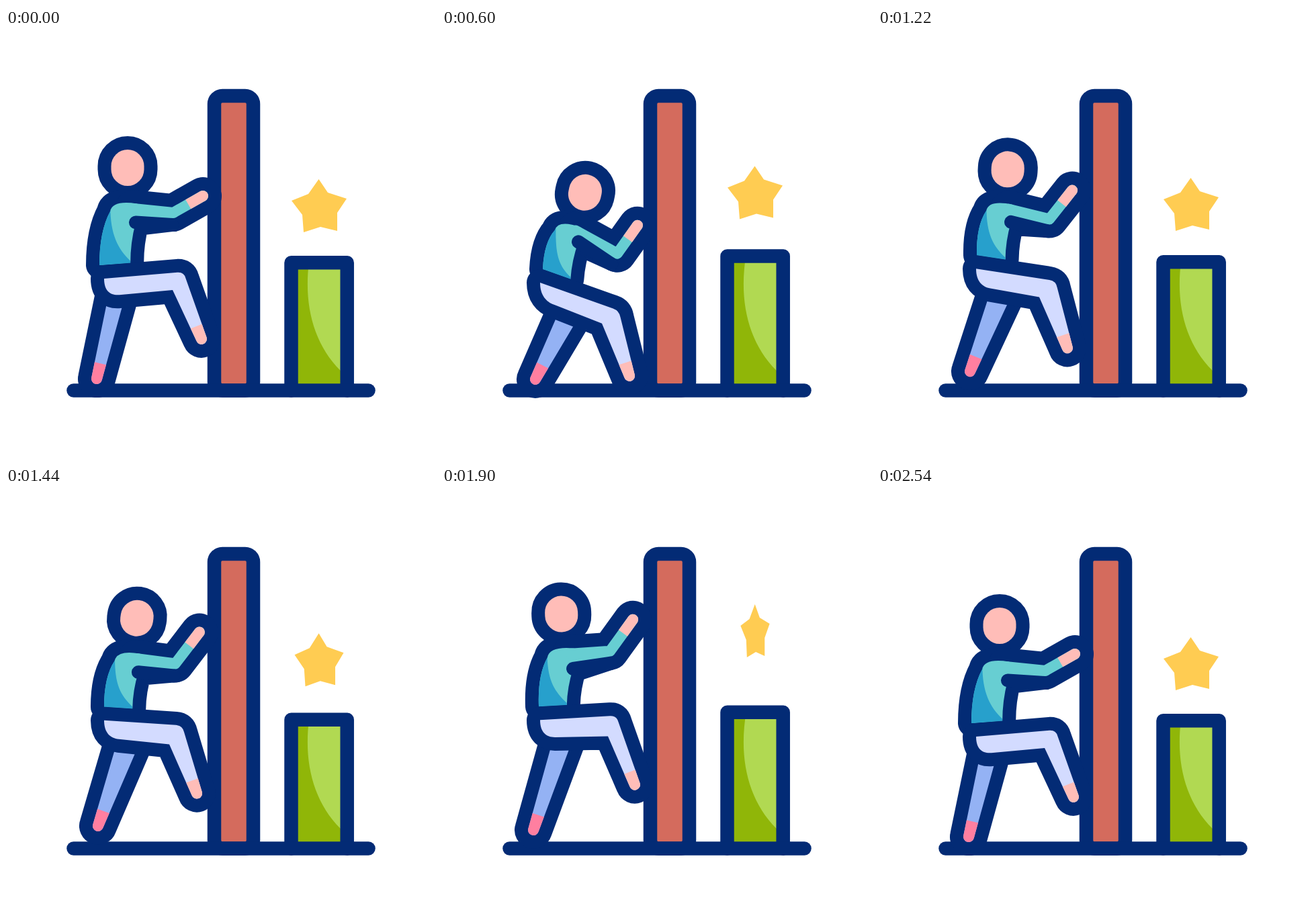
Animation, 640 px wide and 640 px high, one loop 2.66 s. Source, as an HTML page:

```html
<!DOCTYPE html>
<html lang="en">
<head>
<meta charset="utf-8">
<title>Climber</title>
<style>
  html, body { margin: 0; width: 100%; height: 100%; overflow: hidden; background: #fff; }
  svg { display: block; width: 100%; height: 100%; }
  .line { fill: none; stroke: #032b75; stroke-linecap: round; stroke-linejoin: round; }
  .body { stroke: #032b75; stroke-width: 40; stroke-linejoin: round; paint-order: stroke; }
  .limb { fill: none; stroke-width: 16; stroke-linecap: round; stroke-linejoin: round; }
  .tip { fill: none; stroke-width: 60; }
</style>
</head>
<body>
<svg viewBox="0 0 640 640">
  <defs>
    <clipPath id="frontClip"><path id="frontShape"/></clipPath>
    <clipPath id="rearClip"><path id="rearShape"/></clipPath>
    <clipPath id="torsoClip"><path id="torsoShape"/></clipPath>
    <clipPath id="boxClip"><path id="boxShape"/></clipPath>
  </defs>

  <path id="star" fill="#ffcc52" d="M-.5 225 13 245 41 254 27 275V302L2 296-23 304-25 278-41 257-16 247Z"/>

  <path id="boxFill" fill="#b1d952"/>
  <path clip-path="url(#boxClip)" fill="#90b608" d="M420 320H456C439 395 452 466 500 512V545H420Z"/>
  <path id="boxLine" class="line" stroke-width="20.5"/>

  <rect x="310" y="101" width="58" height="438.5" rx="12" fill="#d46b5d" stroke="#032b75" stroke-width="20.5"/>
  <path class="line" stroke-width="20.5" d="M100.5 539.5H539.5"/>

  <path id="rear" class="body" fill="#94b2f4"/>
  <g clip-path="url(#rearClip)"><path id="rearFoot" class="tip" stroke="#ff7fa0"/></g>

  <rect id="head" class="body" x="-24.5" y="-27" width="49" height="54" rx="24.5" fill="#ffbdb8"/>

  <path id="torsoLine" class="line" stroke-width="40"/>
  <path id="armLine" class="line" stroke-width="56"/>
  <path id="torso" fill="#67ced2"/>
  <g clip-path="url(#torsoClip)"><path id="shade" fill="#27a0cc"/></g>
  <path id="arm" class="limb" stroke="#67ced2"/>
  <path id="palm" class="limb" stroke="#ffbdb8" style="stroke-linecap:butt"/>
  <path id="palmEnd" class="limb" stroke="#ffbdb8"/>
  <path id="armpit" class="line" stroke-width="20"/>

  <path id="front" class="body" fill="#d3dbff"/>
  <g clip-path="url(#frontClip)"><path id="frontFoot" class="tip" stroke="#ffbdb8"/></g>
</svg>
<script>
const LOOP = 2660, HIP_X = 146;
const $ = id => document.getElementById(id);
const set = (id, d) => $(id).setAttribute('d', d);

// head x y tilt | shoulder | elbow | hand | hip y | inner knee | outer knee | foot | rear foot | rear thigh x, width | waist x
const rest   = [181,208,0,   180,268, 249,275, 293,250, 373, 248,390, 265,363, 291,463, 135,522, 152,25, 139];
const crouch = [213,245,12,  190,297, 261,336, 291,294, 379, 238,440, 264,421, 279,518, 139,523, 176,35, 150];
const leap   = [163,142,-8,  175,196, 240,176, 274,126, 310, 248,318, 262,277, 291,384, 135,486, 155,31, 142];
const land   = [193,210,3,   185,267, 255,284, 289,241, 358, 240,400, 265,376, 282,476, 137,511, 167,34, 147];
const rise   = [195,197,8,   184,256, 252,265, 288,218, 349, 243,385, 263,357, 284,458, 137,506, 165,34, 146];
const drop   = [177.5,190,-2,182,250, 250,245, 284,198, 348, 247,372, 260,341, 287,444, 136,512, 164,29, 144];

const blend = (a, b, k) => a.map((v, i) => v + (b[i] - v) * k);
const peak = blend(crouch, leap, 1.12);
const deep = blend(crouch, leap, -0.05);

const keys = [
  [220, rest], [555, deep], [600, crouch], [740, blend(crouch, leap, 0.6)], [880, leap],
  [945, peak], [1220, land], [1320, deep], [1440, rise], [1690, peak],
  [1820, blend(drop, peak, 0.73)], [1900, drop], [2050, deep], [2540, rest]
];

// Monotone cubic through the keys: no overshoot, rests at each turning point.
const slope = (j, i) => (keys[j + 1][1][i] - keys[j][1][i]) / (keys[j + 1][0] - keys[j][0]);
function tangent(j, i) {
  if (j === 0 || j === keys.length - 1) return 0;
  const a = slope(j - 1, i), b = slope(j, i);
  return a * b <= 0 ? 0 : 2 * a * b / (a + b);
}
function poseAt(t) {
  if (t <= 220 || t >= 2540) return rest;
  let j = 0;
  while (keys[j + 1][0] < t) j++;
  const [t0, a] = keys[j], [t1, b] = keys[j + 1];
  const h = t1 - t0, u = (t - t0) / h, v = 1 - u;
  return a.map((p, i) =>
    p * (1 + 2 * u) * v * v + b[i] * u * u * (3 - 2 * u) +
    h * (tangent(j, i) * u * v * v - tangent(j + 1, i) * u * u * v));
}

const add = (p, q, k = 1) => [p[0] + q[0] * k, p[1] + q[1] * k];
const lerp = (p, q, k) => [p[0] + (q[0] - p[0]) * k, p[1] + (q[1] - p[1]) * k];
const mid = (p, q) => lerp(p, q, 0.5);
const dir = (p, q) => {
  const x = q[0] - p[0], y = q[1] - p[1], l = Math.hypot(x, y);
  return [x / l, y / l];
};
const turn = p => [-p[1], p[0]];
const s = p => p[0].toFixed(2) + ' ' + p[1].toFixed(2);
const poly = (...pts) => 'M' + pts.map(s).join('L');
const both = (id, d) => { set(id, d); set(id + 'Shape', d); };

function foot(at, d) {
  const n = turn(d);
  return `L${s(add(at, n, -8))}A8 8 0 0 1 ${s(add(at, n, 8))}`;
}

function drawPerson(p) {
  const pt = i => [p[i], p[i + 1]];
  const shoulder = pt(3), elbow = pt(5), hand = pt(7), hip = [HIP_X, p[9]];
  const knee = pt(10), cap = pt(12), toe = pt(14), heel = pt(16);

  $('head').setAttribute('transform', `translate(${s(p)}) rotate(${p[2].toFixed(2)})`);

  // rear leg
  const rl = [p[18], hip[1] + 27 + (p[18] - 152) / 2], rr = add(rl, [p[19], 0]);
  const rd = dir(mid(rl, rr), heel);
  both('rear', `M${s(rr)}${foot(heel, rd)}L${s(rl)}Z`);
  set('rearFoot', poly(add(heel, rd, -23.5), add(heel, rd, 12)));

  // front leg
  const thigh = dir(hip, cap), shin = dir(mid(knee, cap), toe), seat = add(hip, [3, 26]);
  both('front', `M${s(hip)}L${s(add(cap, thigh, -10))}Q${s(cap)} ${s(add(cap, dir(cap, toe), 10))}` +
    foot(toe, shin) + `L${s(knee)}L${s(lerp(seat, knee, 0.2))}` +
    `C${s(lerp(seat, knee, 0.07))} ${s(add(hip, [0, 19]))} ${s(hip)}Z`);
  set('frontFoot', poly(add(toe, shin, -20.5), add(toe, shin, 12)));

  // arm
  const upper = dir(shoulder, elbow), fore = dir(elbow, hand), n = turn(upper);
  const armD = poly(add(shoulder, upper, 10), elbow, hand);
  set('arm', armD);
  set('armLine', armD);
  set('palm', poly(add(hand, fore, -25), hand));
  set('palmEnd', poly(hand, add(hand, fore, 0.01)));
  const pit = add(shoulder, [13, 21.5]);
  set('armpit', poly(pit, add(elbow, n, 18)));

  // torso
  const nape = add(shoulder, [-21.5 + p[2] * 0.37, -12]);
  const wl = [p[20], hip[1] - 20];
  const wr = add(add(hip, thigh, 41), turn(thigh), -20);
  const back = dir(wl, nape), bend = add(mid(wl, nape), turn(back), -10);
  const torsoD = `M${s(wl)}Q${s(bend)} ${s(add(nape, back, -17))}Q${s(nape)} ` +
    `${s(add(add(shoulder, upper, 14), n, -8))}L${s(add(elbow, n, 8))}L${s(pit)}` +
    `Q${s(add(mid(pit, wr), [-4, 0]))} ${s(wr)}Z`;
  both('torso', torsoD);
  set('torsoLine', torsoD);
  set('shade', `M${s(add(nape, [-3, 0]))}C${s(add(nape, [-5, 48]))} ${s(add(wr, [-20, -22]))} ` +
    `${s(add(wr, [0, -3]))}L${s(add(wr, [0, 12]))}L${s(add(wl, [-25, 12]))}L${s(add(nape, [-35, 0]))}Z`);
}

function drawGoal(t) {
  const span = 1100, at = Math.min(Math.max(t - 220, 0), 2 * span);
  const lift = (1 - Math.cos(2 * Math.PI * at / span)) / 2;
  const second = at > span;
  const wide = second ? 0.5 + Math.abs(at / span - 1.5) : 1;
  $('star').setAttribute('transform',
    `translate(466 ${(-lift * (second ? 49.5 : 25)).toFixed(2)}) scale(${wide.toFixed(4)} 1)`);
  const d = `M424.5 539.5V${(349.2 - 12.5 * lift).toFixed(2)}H507.7V539.5`;
  set('boxFill', d);
  set('boxShape', d);
  set('boxLine', d);
}

function render(t) {
  drawPerson(poseAt(t));
  drawGoal(t);
}

const start = performance.now();
function tick(now) {
  render(Math.max(0, now - start) % LOOP);
  requestAnimationFrame(tick);
}
render(0);
requestAnimationFrame(tick);
</script>
</body>
</html>
```
